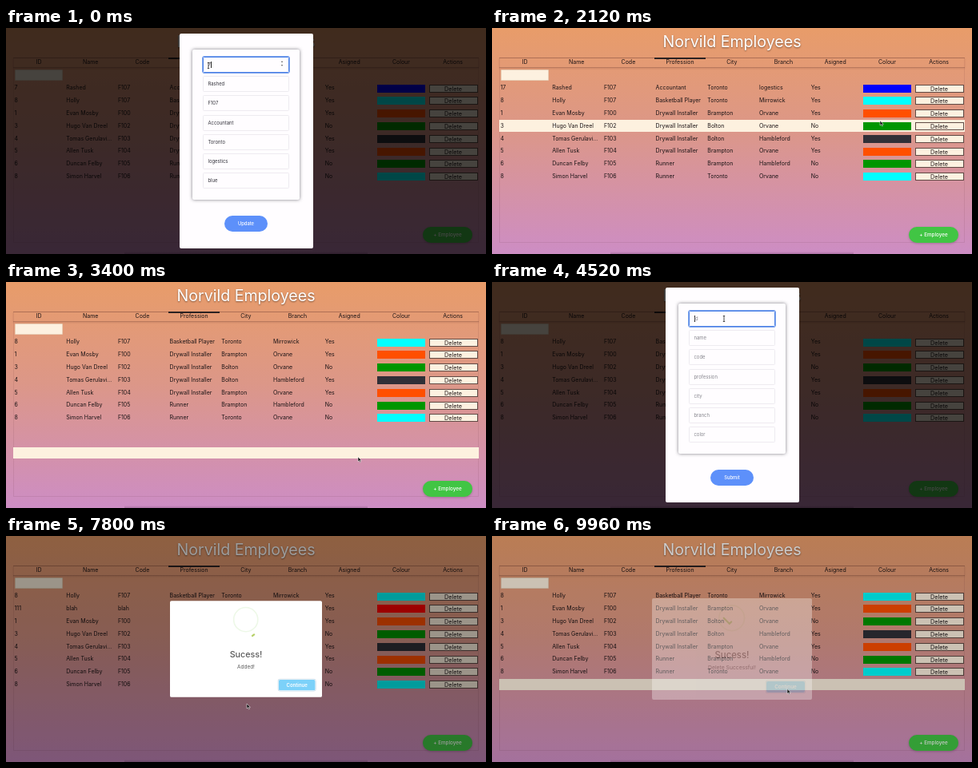
Write an HTML page that moves like this. It is 600x283 px and loops after 10000 ms.

```html
<!DOCTYPE html>
<html lang="en">
<head>
<meta charset="utf-8">
<title>Employees</title>
<style>
html, body { margin: 0; width: 100%; height: 100%; overflow: hidden; }
body { font: 7px/10px Inter, sans-serif; color: #1b1416; }
div, span, b { position: absolute; box-sizing: border-box; white-space: nowrap; font-weight: 400; }
#stage { left: 0; top: 0; width: 600px; height: 283px; overflow: hidden;
  background: linear-gradient(#e89c69, #dc9788 45%, #cd8dc4); }
h1 { position: absolute; margin: 0; width: 100%; top: 5px; text-align: center; color: #fff;
  font: 400 19.6px/24px Inter, sans-serif; text-shadow: 0 1px 2px rgba(0,0,0,.45); }
#table { left: 9px; top: 37px; width: 582px; height: 232px; border: 1px solid rgba(80,30,40,.1); }
#head { left: 9px; top: 37px; width: 582px; height: 13px; border: solid rgba(60,20,20,.25); border-width: 1px 0;
  box-shadow: 0 1px 2px rgba(60,20,20,.12); }
#head b { width: 64px; text-align: center; top: 0; }
#sort { left: 203px; top: 37px; width: 64px; height: 1.5px; background: #2c2222; }
#filter { left: 11px; top: 52px; width: 60px; height: 14px; background: #fdf1e0; border: .5px solid #e8cdb4; border-radius: 1px; }
#hover { left: 9px; width: 582px; background: #fdf1df; }
.row { left: 0; width: 600px; height: 15.8px; }
.row span { top: 2.8px; }
.row i { position: absolute; left: 463.5px; top: 3px; width: 60.5px; height: 10px; }
.row b { left: 528.5px; top: 3px; width: 61px; height: 10px; line-height: 9px; font-size: 7.2px; text-align: center;
  background: #fdf1e0; border: 1px solid #5f4a44; }
.row .focus { border-color: #4a5fd8; box-shadow: 0 0 0 1px #5b7cf0; }
#add { left: 521px; top: 248.5px; width: 62px; height: 20.5px; border-radius: 10.5px; background: #41c544; color: #fff;
  font-size: 6.3px; font-weight: 500; line-height: 20.5px; text-align: center; box-shadow: 0 1px 3px rgba(0,0,0,.2); }
#strip { left: 148px; top: 280px; width: 304px; height: 3px; background: linear-gradient(rgba(70,30,70,0), rgba(70,30,70,.25)); }
.veil { inset: 0; }
#form { background: rgba(0,0,0,.72); }
#panel { left: 216.5px; top: 6.5px; width: 167px; height: 269.5px; background: #fffdff; border-radius: 2px; }
#card { left: 16.5px; top: 20px; width: 134px; height: 188px; border-radius: 2px; background: #fffdff;
  box-shadow: 0 0 4px rgba(40,40,50,.6); }
.field { left: 13px; width: 108px; height: 20px; border: 1px solid #eeebf0; border-radius: 1.5px; padding-left: 5.5px;
  font-size: 5.9px; line-height: 18px; color: #33333b; }
.field.empty { color: #85858c; }
.field.focus { border-color: #4c82e6; box-shadow: 0 0 0 .7px #4c82e6; }
.field u { display: inline-block; width: .7px; height: 8px; margin-right: -.7px; background: #222; vertical-align: middle; }
#spin { left: 111px; top: 12px; font-size: 4px; line-height: 5px; color: #555; white-space: pre; }
#send { left: 56.5px; top: 228px; width: 54px; height: 20.5px; border-radius: 10px; background: #5d90fa; color: #fff;
  font-size: 5.8px; font-weight: 500; line-height: 20.5px; text-align: center; }
#dim { background: rgba(0,0,0,.4); }
#alert { left: 200px; top: 78px; width: 200px; height: 127px; border-radius: 2px; background: #fff; text-align: center; }
#alert svg { position: absolute; left: 83px; top: 8px; overflow: visible; }
#alert div { width: 100%; }
#alert .title { top: 64px; font-size: 11.3px; line-height: 14px; color: rgba(0,0,0,.65); font-weight: 500; }
#note { top: 82px; font-size: 6.8px; color: rgba(0,0,0,.64); }
#alert b { left: 143px; top: 104px; width: 48px; height: 14px; border-radius: 2px; background: #7cd1f9; color: #fff;
  font-size: 6.3px; font-weight: 600; line-height: 14px; box-shadow: 0 0 0 .5px #fff, 0 0 0 1.2px rgba(43,114,165,.25); }
#mouse { position: absolute; left: 0; top: 0; overflow: visible; }
</style>
</head>
<body>
<div id="stage">
  <h1>Norvild Employees</h1>
  <div id="table"></div>
  <div id="hover"></div>
  <div id="head"></div>
  <div id="sort"></div>
  <div id="filter"></div>
  <div id="rows"></div>
  <div id="strip"></div>
  <div id="add">+ Employee</div>
  <div id="form" class="veil">
    <div id="panel">
      <div id="card"><div id="fields"></div><div id="spin">▴
▾</div></div>
      <div id="send"></div>
    </div>
  </div>
  <div id="dim" class="veil"></div>
  <div id="alert">
    <svg width="33.4" height="33.4" viewBox="0 0 80 80" fill="none" stroke="#a5dc86">
      <circle cx="40" cy="40" r="38" stroke-width="4" stroke-opacity=".2"/>
      <path id="check" d="M16 40L33 57L66 24" pathLength="100" stroke-width="5" stroke-dasharray="100 200" stroke-linecap="round"/>
      <path id="stub" d="M59 93l9-7" stroke="#b5cf66" stroke-width="5"/>
    </svg>
    <div class="title">Sucess!</div>
    <div id="note"></div>
    <b>Continue</b>
  </div>
  <svg id="mouse" width="6" height="9">
    <path id="arrow" d="M0 0V6L1.5 4.7L2.5 7L3.5 6.5L2.5 4.4H4.4Z" fill="#111" stroke="#fff" stroke-width=".5"/>
    <path id="beam" d="M-1.2-3.5H1.2M0-3.5V3.5M-1.2 3.5H1.2" stroke="#222" stroke-width=".8"/>
  </svg>
</div>
<script>
const LOOP = 10000, ROW = 15.8, PAD = 14.2, TOP = 67.6;
const $ = id => document.getElementById(id);
const clamp = v => Math.max(0, Math.min(1, v));
const smooth = p => p * p * (3 - 2 * p);
const ease = p => 1 - Math.pow(1 - clamp(p), 2.2);

// Value of a track of [time, ...numbers] at t
function track(keys, t) {
  let i = 0;
  while (i < keys.length - 2 && t >= keys[i + 1][0]) i++;
  const a = keys[i], b = keys[i + 1];
  const p = smooth(clamp((t - a[0]) / (b[0] - a[0])));
  return a.slice(1).map((v, k) => v + (b[k + 1] - v) * p);
}

const heads = ['ID', 'Name', 'Code', 'Profession', 'City', 'Branch', 'Asigned', 'Colour', 'Actions'];
const edited = ['17', 'Rashed', 'F107', 'Accountant', 'Toronto', 'logestics', 'Yes', '#0000ff'];
const added = ['111', 'blah', 'blah', 'blah', 'blah', 'blah', 'Yes', '#ff0000'];
const staff = [
  ['8', 'Holly', 'F107', 'Basketball Player', 'Toronto', 'Mirrowick', 'Yes', '#00ffff'],
  ['1', 'Evan Mosby', 'F100', 'Drywall Installer', 'Brampton', 'Orvane', 'Yes', '#ff4f00'],
  ['3', 'Hugo Van Dreel', 'F102', 'Drywall Installer', 'Bolton', 'Orvane', 'No', '#009600'],
  ['4', 'Tomas Gerulavi...', 'F103', 'Drywall Installer', 'Bolton', 'Hambleford', 'Yes', '#302f37'],
  ['5', 'Allen Tusk', 'F104', 'Drywall Installer', 'Brampton', 'Orvane', 'Yes', '#ff4f00'],
  ['6', 'Duncan Felby', 'F105', 'Runner', 'Brampton', 'Hambleford', 'No', '#009600'],
  ['8', 'Simon Harvel', 'F106', 'Runner', 'Toronto', 'Orvane', 'No', '#00ffff']
];
const labels = ['id', 'name', 'code', 'profession', 'city', 'branch', 'color'];

const alerts = [
  { open: 760, close: 1440, note: 'Updated!' },
  { open: 2520, close: 3120, note: 'Delete Successful!' },
  { open: 7560, close: 8300, note: 'Added!' },
  { open: 9420, close: 9880, note: 'Delete Successful!' }
];
const forms = [{ open: -900, close: 620 }, { open: 3900, close: 7200 }];
// [focus time, first key, last key] per field
const typing = [[4520, 4640, 4880], [4960, 5040, 5280], [5320, 5400, 5640], [5700, 5760, 6000],
  [6080, 6240, 6380], [6420, 6460, 6600], [6620, 6660, 6800]];
const path = [[0, 253, 47], [160, 256, 60], [320, 256, 60], [600, 300, 245], [720, 300, 245],
  [1300, 364, 187], [1440, 364, 187], [2120, 485, 116], [2380, 556, 76], [2560, 556, 77],
  [2980, 366, 187], [3120, 368, 188], [3400, 440, 219], [3480, 440, 219], [3860, 552, 259],
  [3960, 552, 259], [4400, 290, 46], [6900, 290, 46], [7160, 300, 245], [7300, 300, 245],
  [7800, 301, 210], [8220, 362, 186], [8340, 362, 187], [9220, 543, 95], [9440, 543, 95],
  [9820, 369, 191.5], [10000, 369, 191.5]];
const pop = [[0, .5], [135, 1.05], [240, .95], [300, 1]];

$('head').innerHTML = heads.map((h, i) => `<b style="left:${i * 64.7}px">${h}</b>`).join('');
$('fields').innerHTML = labels.map((l, i) => `<div class="field" style="top:${9.5 + i * 24.2}px"></div>`).join('');
const fields = [...$('fields').children];

// Rewrites an element only when its content differs
function put(el, html) {
  if (el.shown !== html) el.innerHTML = el.shown = html;
}

function rowsAt(t) {
  if (t < 760) return [['7', ...edited.slice(1)], ...staff];
  if (t < 2520) return [edited, ...staff];
  if (t >= 7560 && t < 9420) return [staff[0], added, ...staff.slice(1)];
  return staff;
}

function drawRows(rows, focus) {
  put($('rows'), rows.map((r, i) => {
    const cells = r.slice(0, 7).map((c, k) => `<span style="left:${10.5 + k * 64.7}px">${c}</span>`).join('');
    return `<div class="row" style="top:${(TOP + i * ROW).toFixed(1)}px">${cells}<i style="background:${r[7]}"></i>` +
      `<b class="${i === focus ? 'focus' : ''}">Delete</b></div>`;
  }).join(''));
}

function drawHover(x, y, count, blocked) {
  const end = TOP + count * ROW;
  const pads = Math.max(0, 10 - count);
  const pitch = y < end ? ROW : PAD, from = y < end ? TOP : end;
  const on = !blocked && x > 9 && x < 591 && y >= TOP && y < end + pads * PAD;
  const s = $('hover').style;
  s.display = on ? '' : 'none';
  s.top = from + Math.floor((y - from) / pitch) * pitch + .4 + 'px';
  s.height = Math.min(pitch, 14.6) + 'px';
}

function drawForm(t, y) {
  const f = forms.find(f => t >= f.open && t < f.close + 300);
  $('form').style.opacity = f ? ease((t - f.open) / 300) * (1 - ease((t - f.close) / 300)) : 0;
  if (!f) return;
  const edit = f === forms[0];
  put($('send'), edit ? 'Update' : 'Submit');
  const current = edit ? 0 : typing.filter(k => t >= k[0]).length - 1;
  fields.forEach((el, i) => {
    let text;
    if (edit) text = i === 0 ? (t < 80 ? '7' : '17') : i === 6 ? 'blue' : edited[i];
    else {
      const [, from, to] = typing[i], word = i === 6 ? 'red' : added[i];
      const n = t < from ? 0 : 1 + Math.floor((t - from) / (to - from) * (word.length - 1));
      text = word.slice(0, n);
    }
    const focus = i === current;
    el.className = 'field' + (text ? '' : ' empty') + (focus ? ' focus' : '');
    const caret = focus ? '<u></u>' : '';
    put(el, text ? text + caret : caret + labels[i]);
  });
  $('spin').style.display = edit && y < 56 ? '' : 'none';
}

function drawAlert(t) {
  const a = alerts.find(a => t >= a.open && t < a.close + 300);
  $('alert').style.display = $('dim').style.display = a ? '' : 'none';
  if (!a) return;
  const age = t - a.open, gone = t - a.close;
  $('dim').style.opacity = ease(age / 300) * (1 - ease(gone / 300));
  $('alert').style.opacity = ease(age / 200) * (1 - ease(gone / 200));
  $('alert').style.transform = `scale(${track(pop, age)[0]})`;
  put($('note'), a.note);
  const p = smooth(clamp((age - 400) / 300));
  $('check').style.strokeDashoffset = 100 * (1 - p);
  $('check').style.display = p > 0 ? '' : 'none';
  $('stub').style.display = age > 150 && age < 400 ? '' : 'none';
}

function draw(t) {
  const [x, y] = track(path, t);
  const rows = rowsAt(t);
  const blocked = [...forms, ...alerts].some(o => t >= o.open && t < o.close);
  const focus = t >= 2400 && t < 2520 ? 0 : t >= 9260 && t < 9420 ? 1 : -1;
  drawRows(rows, focus);
  drawHover(x, y, rows.length, blocked);
  drawForm(t, y);
  drawAlert(t);
  const beam = t < 420 || (t > 4340 && t < 4600);
  $('beam').style.display = beam ? '' : 'none';
  $('arrow').style.display = beam ? 'none' : '';
  $('mouse').style.display = t > 4600 && t < 7000 ? 'none' : '';
  $('mouse').style.transform = `translate(${x}px,${y}px)`;
}

const start = performance.now();
function tick() {
  draw((performance.now() - start) % LOOP);
  requestAnimationFrame(tick);
}
tick();
</script>
</body>
</html>
```
